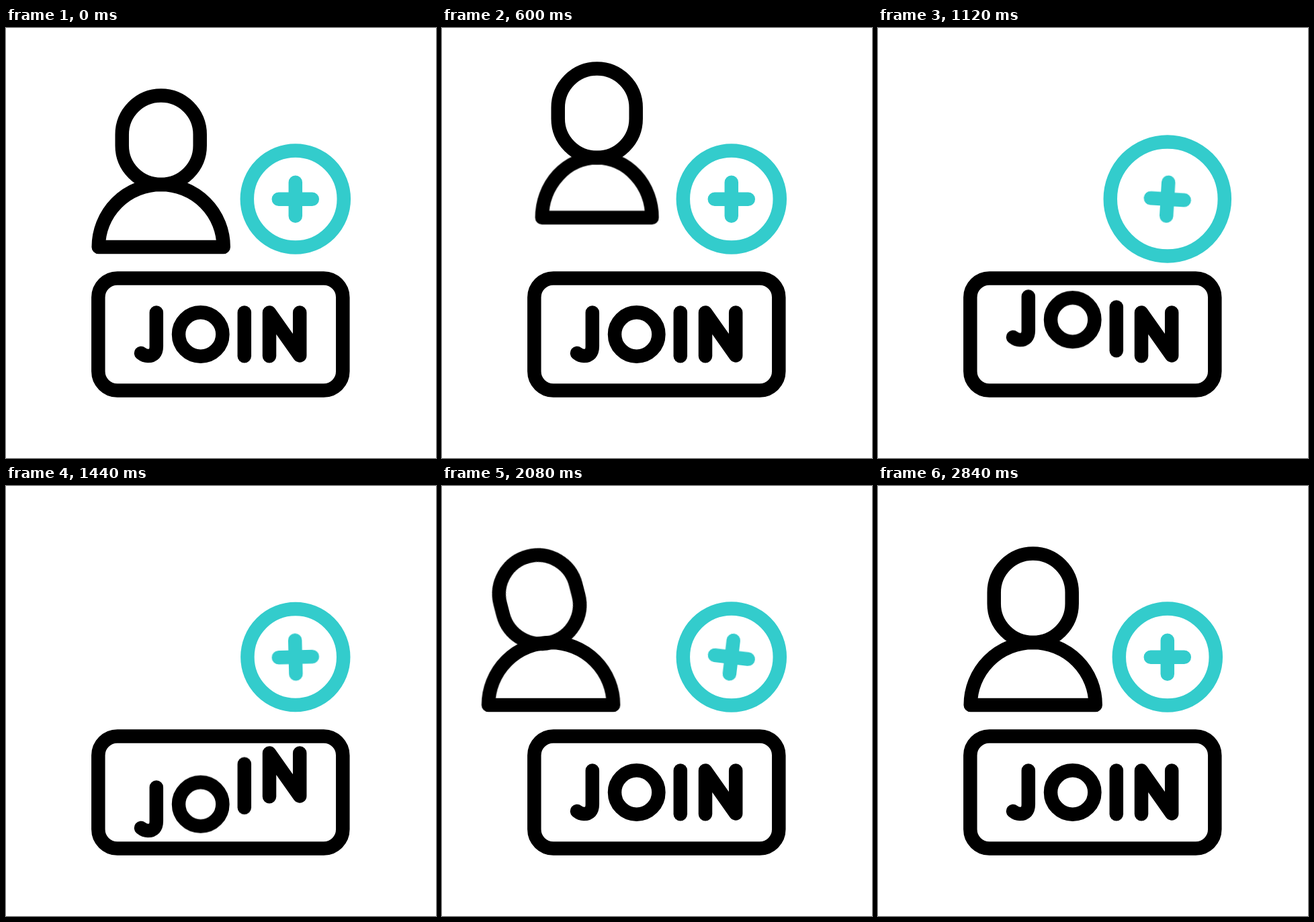
Animation, 640 px wide and 640 px high, one loop 3 s. Source, as an HTML page without scripts:

```html
<!DOCTYPE html>
<html lang="en">
<head>
<meta charset="utf-8">
<title>Join</title>
<style>
  @property --top { syntax: "<number>"; inherits: true; initial-value: 100.5; }
  @property --neck { syntax: "<number>"; inherits: true; initial-value: 233; }

  html, body { margin: 0; width: 100%; height: 100%; overflow: hidden; background: #fff; }
  svg { display: block; width: 100%; height: 100%; }

  svg * {
    animation-duration: 3s;
    animation-iteration-count: infinite;
    animation-timing-function: cubic-bezier(.33, 0, .67, 1);
  }
  .ink, .accent {
    fill: none; stroke: #000; stroke-width: 20.5;
    stroke-linecap: round; stroke-linejoin: round;
  }
  .accent { stroke: #33cccc; }

  /* Person: crown and neck heights move apart to stretch the head */
  .person { animation-name: crown, neck, enter; }
  .head {
    x: 172.7px; y: calc(var(--top) * 1px);
    width: 116px; height: calc((var(--neck) - var(--top)) * 1px); rx: 58px;
    transform-origin: 230.5px 235px;
    animation-name: tilt;
  }
  .body {
    translate: 230.7px calc(var(--neck) * 1px);
    vector-effect: non-scaling-stroke;
    animation-name: squeeze;
  }
  @keyframes crown {
    0% { --top: 100.5; }
    6.67% { --top: 100.5; animation-timing-function: cubic-bezier(.3, 0, .3, 1); }
    20%, 22% { --top: 60.5; }
    35.9%, 58% { --top: 400; }
    58.01%, 100% { --top: 100.5; }
  }
  @keyframes neck {
    0% { --neck: 233; }
    6.67% { --neck: 233; animation-timing-function: cubic-bezier(.25, 0, .25, 1); }
    19.33%, 20.63% { --neck: 193; }
    34.37%, 58% { --neck: 533; }
    58.01%, 100% { --neck: 233; }
  }
  @keyframes squeeze {
    0% { scale: 1 1; }
    6.67% { scale: 1 1; animation-timing-function: cubic-bezier(.25, 0, .25, 1); }
    19.33%, 20.63% { scale: .88 .96; }
    26.67%, 58% { scale: .88 1.1; }
    58.01%, 100% { scale: 1 1; }
  }
  @keyframes enter {
    0%, 58% { transform: none; }
    58.01%, 58.67% { transform: translateX(-350px); }
    73.67% { transform: translateX(2px); }
    84% { transform: translateX(.6px); }
    94.67%, 100% { transform: none; }
  }
  @keyframes tilt {
    0%, 58% { transform: rotate(0); }
    58.01%, 62% { transform: rotate(-18deg); }
    69.33% { transform: rotate(-14.5deg); }
    76.67% { transform: rotate(5deg); }
    85.33% { transform: rotate(-2deg); }
    94.67%, 100% { transform: rotate(0); }
  }

  .ring { animation-name: pulse; }
  .plus { transform-origin: 430.8px 254.7px; animation-name: turn; }
  @keyframes pulse {
    0%, 24.33%, 46.67%, 69%, 100% { r: 72px; }
    35.5% { r: 86.1px; }
    57.83% { r: 57.9px; }
  }
  @keyframes turn {
    0% { transform: rotate(0); }
    24% { transform: rotate(0); animation-timing-function: cubic-bezier(.36, 0, .68, 1); }
    49.33% { transform: rotate(180deg); animation-timing-function: cubic-bezier(.3, 0, .67, 1); }
    72%, 100% { transform: rotate(0); }
  }

  /* Letters share one wave, each 120 ms after the last */
  .word * { animation-name: wave; animation-delay: calc(var(--i) * 120ms); }
  @keyframes wave {
    0%, 25.4%, 57.4%, 100% { transform: none; }
    36.07% { transform: translateY(-26px); }
    46.73% { transform: translateY(26px); }
  }
</style>
</head>
<body>
<svg viewBox="0 0 640 640" role="img" aria-label="JOIN">
  <clipPath id="above"><rect width="640" height="456"/></clipPath>

  <g clip-path="url(#above)">
    <g class="person ink">
      <rect class="head"/>
      <path class="body" d="M-93 93A93 93 0 0 1 93 93Z"/>
    </g>
  </g>

  <g class="accent">
    <circle class="ring" cx="430.8" cy="254.5" r="72"/>
    <path class="plus" d="M405.8 254.7h50M430.8 229.7v50"/>
  </g>

  <rect class="ink" x="137.3" y="372.5" width="364" height="167" rx="28.5" style="fill:#fff"/>
  <g class="word ink">
    <path style="--i:0" d="M223.8 423.5V474Q223.8 488 211 488Q206 488 201 484"/>
    <circle style="--i:1" cx="289.7" cy="456" r="32.7"/>
    <path style="--i:2" d="M354.8 423.5V488.3"/>
    <path style="--i:3" d="M392 488.3V423.5L437.2 487.5V423.5"/>
  </g>
</svg>
</body>
</html>
```
